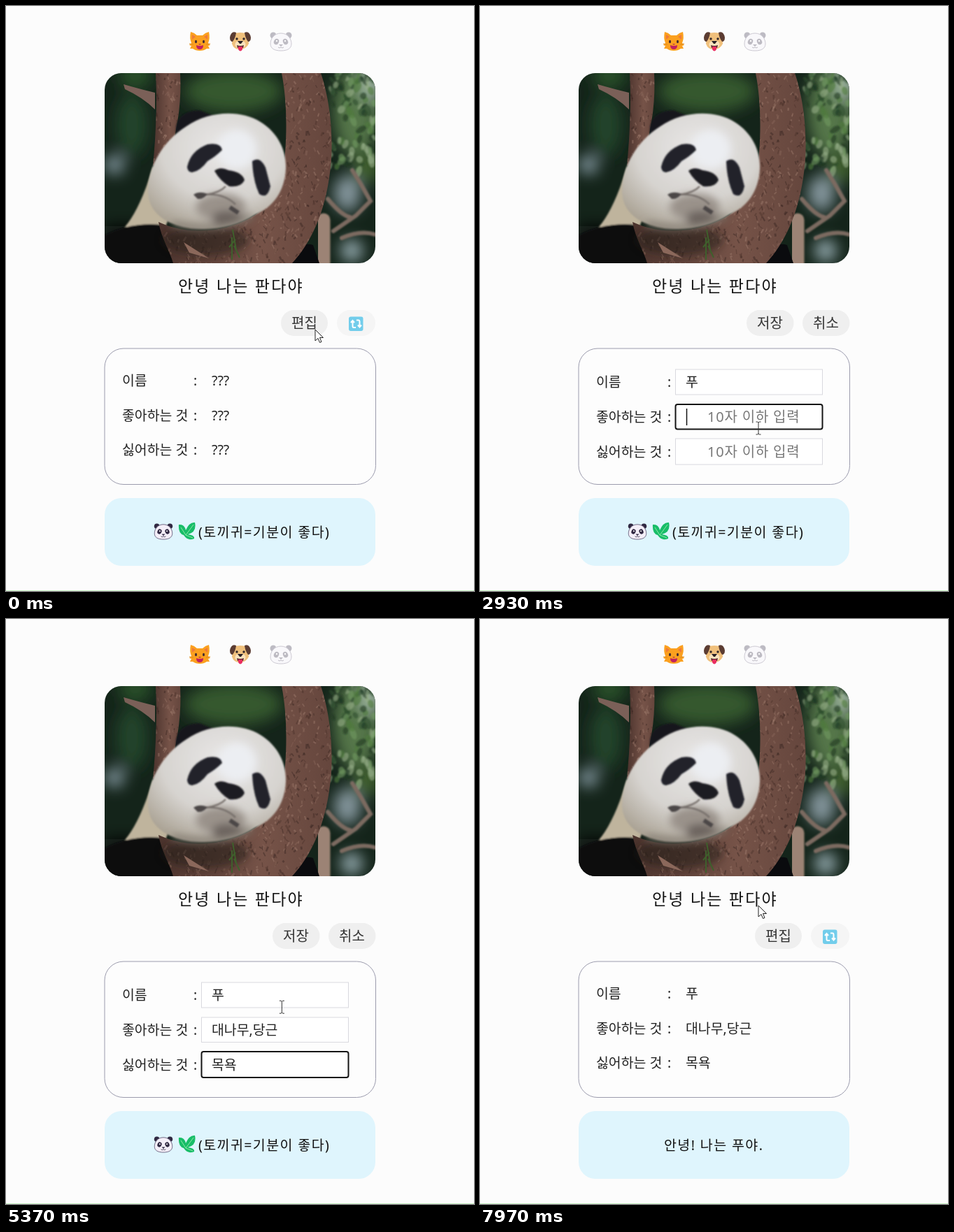
These frames come from a looping animation (669 by 837 pixels, 8000 ms). An HTML page:

```html
<!DOCTYPE html>
<html lang="ko">
<head>
<meta charset="utf-8">
<style>
html, body { margin: 0; width: 100%; height: 100%; overflow: hidden; background: #fcfcfc; }
svg { display: block; width: 669px; height: 837px; }
text { font: 300 19.4px "Noto Sans", "Noto Sans CJK KR", "Noto Sans CJK", sans-serif; fill: #222; white-space: pre; }
.note { font-size: 19.5px; font-weight: 500; letter-spacing: 1.4px; fill: #111; }
.title { font-size: 23px; font-weight: 500; letter-spacing: 2.2px; fill: #111; }
.button { font-size: 20px; fill: #333; }
.hint { font-size: 20px; letter-spacing: .8px; fill: #777; }
</style>
</head>
<body>
<svg viewBox="0 0 669 837">
  <defs>
    <clipPath id="frame"><rect x="141" y="96" width="387" height="272" rx="24"/></clipPath>
    <filter id="soft" x="-50%" y="-50%" width="200%" height="200%"><feGaussianBlur stdDeviation="11"/></filter>
    <filter id="fur" x="-10%" y="-10%" width="120%" height="120%"><feGaussianBlur stdDeviation="1.2"/></filter>
    <filter id="shade" x="-50%" y="-50%" width="200%" height="200%"><feGaussianBlur stdDeviation="6"/></filter>
    <linearGradient id="pressed" x1="0" y1="0" x2=".4" y2="1">
      <stop stop-color="#dedede"/><stop offset="1" stop-color="#b9b9b9"/>
    </linearGradient>
    <radialGradient id="head" cx=".55" cy=".3" r=".75">
      <stop stop-color="#e9e8e8"/><stop offset=".6" stop-color="#d6d3cf"/><stop offset="1" stop-color="#aaa294"/>
    </radialGradient>
    <linearGradient id="bark">
      <stop stop-color="#4b332d"/><stop offset=".6" stop-color="#765348"/><stop offset="1" stop-color="#65463d"/>
    </linearGradient>
    <path id="trunk" d="M394 96C403 140 402 200 395 245C380 292 345 312 300 320C262 325 238 318 218 309C222 332 234 350 239 368H409C442 332 460 282 465 220C468 170 460 125 450 96Z"/>
    <path id="limb" d="M214 96H249Q252 150 236 207L210 229Q217 155 214 96Z"/>
    <clipPath id="woodClip"><use href="#trunk"/><use href="#limb"/></clipPath>

    <g id="cat">
      <path d="M-13-14Q-8-13-4-9H4Q8-13 13-14Q15-5 12 2L15 5L12 6L14 10L10 10Q6 13 0 13T-10 10L-14 10L-12 6L-15 5L-12 2Q-15-5-13-14Z" fill="#fba01f"/>
      <path d="M-11-10L-6-7L-11-3ZM11-10L6-7L11-3Z" fill="#ee7a3b"/>
      <path d="M-15 3L-9 4M15 3L9 4" stroke="#d98a20"/>
      <ellipse cx="-5.500" cy="0" rx="1.500" ry="2.200" fill="#402a32"/><ellipse cx="5.500" cy="0" rx="1.500" ry="2.200" fill="#402a32"/>
      <path d="M-5 5Q0 7 5 5Q5 11 0 11T-5 5Z" fill="#c0215f"/><path d="M-2 3H2L0 5Z" fill="#b93a52"/>
    </g>
    <g id="dog">
      <path d="M-11-11Q0-15 11-11L12 3Q9 10 0 11T-12 3Z" fill="#f0c07c"/>
      <path d="M-6-13Q-13-16-15-6Q-15 0-11 0Q-7-5-6-13ZM6-13Q13-16 15-6Q15 0 11 0Q7-5 6-13Z" fill="#5b3c32"/>
      <ellipse cy="4" rx="7.500" ry="5.500" fill="#fbe3bd"/>
      <circle cx="-5" cy="-4" r="1.700" fill="#2f2529"/><circle cx="5" cy="-4" r="1.700" fill="#2f2529"/>
      <path d="M-4-1H4L1 3H-1Z" fill="#282025"/>
      <path d="M-5 5Q0 7 5 5L4 9H-4Z" fill="#50252c"/>
      <path d="M-3 7H3V11Q0 16-3 11Z" fill="#ea2e61"/>
    </g>
    <g id="panda">
      <circle cx="-11" cy="-9" r="4.500" fill="#302842"/><circle cx="11" cy="-9" r="4.500" fill="#302842"/>
      <path d="M0-12C10-12 15-4 15 3S9 13 0 13S-15 10-15 3S-10-12 0-12Z" fill="#f4eff9" stroke="#5b5270"/>
      <ellipse cx="-6.500" cy="0" rx="3.500" ry="4.300" fill="#302842" transform="rotate(25 -6.500 0)"/>
      <ellipse cx="6.500" cy="0" rx="3.500" ry="4.300" fill="#302842" transform="rotate(-25 6.500 0)"/>
      <circle cx="-6" cy="-1" r="1.200" fill="#fff"/><circle cx="6" cy="-1" r="1.200" fill="#fff"/>
      <path d="M-3 4H3L0 7Z" fill="#302842"/><path d="M-4 8Q-2 10 0 8Q2 10 4 8" fill="none" stroke="#302842"/>
    </g>

    <g id="arrow" stroke="#222" fill="#fff"><path d="M0 0V16L4 12.500L6.500 18.500L9 17.500L6.500 11.500H11.500Z"/></g>
    <g id="hand" stroke="#222" fill="#fff"><path d="M-2 13V1Q-2-1.500 0-1.500T2 1V8Q5 6 6 9Q8 7 9 10Q12 9 12 12V17Q12 20 10 23H0Q-1 20-6 14Q-6 10-2 13Z"/><path d="M3 14V19M6 14V19"/></g>
    <g id="beam" stroke="#333" fill="none"><path d="M-3.500-9H-1.500L0-8L1.500-9H3.500M0-8V8M-3.500 9H-1.500L0 8L1.500 9H3.500"/></g>
  </defs>

  <rect width="669" height="837" fill="#fcfcfc"/>
  <path d="M0 836.500H669" stroke="#c9f3c4"/>
  <use href="#cat" x="277" y="51"/>
  <use href="#dog" x="335" y="51"/>
  <use href="#panda" x="393" y="51" opacity=".3"/>

  <g clip-path="url(#frame)">
    <rect x="141" y="96" width="387" height="272" fill="#14241a"/>
    <g filter="url(#soft)">
      <ellipse cx="325" cy="122" rx="70" ry="30" fill="#34592e"/>
      <ellipse cx="180" cy="170" rx="22" ry="45" fill="#24452b"/>
      <ellipse cx="185" cy="100" rx="24" ry="16" fill="#2c5529"/>
      <ellipse cx="155" cy="227" rx="13" ry="12" fill="#9db2bf"/>
      <ellipse cx="500" cy="150" rx="32" ry="65" fill="#547648"/>
      <ellipse cx="522" cy="112" rx="15" ry="25" fill="#a3b9a5"/>
      <ellipse cx="488" cy="268" rx="19" ry="26" fill="#8799a0"/>
      <ellipse cx="494" cy="350" rx="15" ry="15" fill="#a4bbc2"/>
      <ellipse cx="515" cy="232" rx="18" ry="22" fill="#43632f"/>
      <rect x="141" y="315" width="90" height="60" fill="#080b0d"/>
    </g>
    <g id="leaves" filter="url(#fur)"></g>
    <g fill="none" stroke="#7b6a60" stroke-linecap="round" filter="url(#fur)">
      <path d="M495 235L508 256L521 279L500 300L468 322" stroke-width="6"/>
      <path d="M460 276Q480 300 492 302M480 332Q507 320 528 327" stroke-width="6"/>
      <path d="M454 306V368" stroke="#9c8375" stroke-width="19"/>
    </g>
    <path d="M168 112Q192 119 213 124V148Q196 131 170 119Z" fill="#7b6058"/>
    <use href="#limb" fill="url(#bark)"/>
    <path d="M403 368Q418 335 439 342L448 368Z" fill="#0a0b0e"/>
    <g filter="url(#fur)">
      <path d="M243 184Q240 151 276 149L299 158L255 190Z" fill="#15171d"/>
      <path d="M210 230Q192 290 170 316L225 324L245 270Z" fill="#bfb49d"/>
      <path d="M141 328Q178 309 222 313L246 372H141Z" fill="#090b0f"/>
    </g>
    <use href="#trunk" fill="url(#bark)"/>
    <g id="grain" clip-path="url(#woodClip)"></g>
    <ellipse cx="285" cy="335" rx="62" ry="22" fill="#241a17" opacity=".55" filter="url(#shade)"/>
    <g filter="url(#fur)">
      <path d="M203 266C203 228 226 192 258 172C290 150 335 148 364 166C390 182 401 209 400 232C399 264 382 288 357 298C333 313 309 318 283 319C243 320 204 303 203 266Z" fill="url(#head)"/>
    </g>
    <g filter="url(#shade)">
      <ellipse cx="307" cy="288" rx="36" ry="20" fill="#9a928a"/>
      <ellipse cx="316" cy="303" rx="22" ry="10" fill="#6b625d"/>
      <ellipse cx="330" cy="205" rx="28" ry="28" fill="#eceef2"/>
      <path d="M238 312Q300 326 352 300" fill="none" stroke="#7d756c" stroke-width="7"/>
    </g>
    <g filter="url(#fur)">
      <path d="M259 230Q264 207 288 198Q307 195 309 206Q300 215 288 222Q278 236 266 238Q259 237 259 230Z" fill="#20222a"/>
      <path d="M352 222Q363 214 371 231L378 258Q374 277 362 269Q353 250 352 222Z" fill="#20222a"/>
      <path d="M298 236Q306 229 318 235Q337 237 341 249Q336 260 319 258Q306 250 298 236Z" fill="#1d1b20"/>
      <path d="M314 258Q306 267 286 270Q312 268 328 284" fill="none" stroke="#77706c" stroke-width="2.500"/>
      <path d="M268 270Q276 264 288 269Q282 277 274 276Z" fill="#4b4647"/>
      <path d="M320 288L332 296" stroke="#4b4647" stroke-width="6"/>
    </g>
    <path d="M254 338L290 361L262 353Z" fill="#8b685b"/>
    <path d="M323 363V331M329 349L324 320M319 345L328 334M334 360L326 343" stroke="#3f5f2c" stroke-width="2"/>
  </g>

  <text class="title" x="246" y="409">안녕 나는 판다야</text>

  <rect x="141" y="490" width="387.500" height="194.500" rx="27" fill="#fdfdfd" stroke="#9b9bad"/>
  <g id="view">
    <rect id="editButton" x="393" y="435" width="67" height="37" rx="18.500" fill="#efefef"/>
    <text class="button" x="408" y="461">편집</text>
    <rect x="473" y="435" width="55" height="37" rx="18.500" fill="#f5f5f5"/>
    <rect x="490" y="444.500" width="20.500" height="20.500" rx="3" fill="#72cdeb"/>
    <path d="M500 460H497Q495.500 460 495.500 458V450M493 453L495.500 450L498 453M501 449.500H504Q505.500 449.500 505.500 452V459M503 456.500L505.500 459.500L508 456.500" fill="none" stroke="#fff" stroke-width="2"/>
  </g>
  <g id="edit">
    <rect id="saveButton" x="381" y="435" width="67.500" height="37" rx="18.500" fill="#efefef"/>
    <text class="button" x="396" y="461">저장</text>
    <rect x="461" y="435" width="67.500" height="37" rx="18.500" fill="#efefef"/>
    <text class="button" x="476" y="461">취소</text>
  </g>
  <g id="rows"></g>
  <path id="caret" stroke="#111" stroke-width="1.500"/>

  <rect x="141" y="704" width="387" height="97" rx="24" fill="#dff5fd"/>
  <g class="message">
    <use href="#panda" transform="translate(225 752) scale(.85)"/>
    <path d="M247 742Q255 741 257 750Q262 738 270 739Q273 753 260 756Q270 757 269 762Q260 766 254 757Q246 755 247 742Z" fill="#18bd68"/>
    <path d="M250 746L257 757L268 742M257 757L267 761" fill="none" stroke="#8ee9a6"/>
    <text class="note" x="275" y="760">(토끼귀=기분이 좋다)</text>
  </g>
  <g class="message">
    <text class="note" x="235" y="760">대나무,당근 좋아!!</text>
    <circle cx="417" cy="751" r="12.500" fill="#f8b32d"/>
    <path id="heart" d="M410 752Q402 746 404 741Q407 737 411 741Q415 737 417 742Q417 747 410 752Z" fill="#d9147a"/>
    <use href="#heart" x="13.500"/>
    <path d="M409 754Q417 756 425 754Q424 761 417 761T409 754Z" fill="#7b2941"/>
  </g>
  <g class="message"><text class="note" x="263" y="760">안녕! 나는 푸야.</text></g>
  <use id="cursor"/>
</svg>

<script>
const DURATION = 8000, EDIT_START = 560, EDIT_END = 5680;
const $ = id => document.getElementById(id);
const show = (el, on) => el.setAttribute('visibility', on ? 'visible' : 'hidden');

function add(parent, tag, attrs, text = '') {
  const el = document.createElementNS('http://www.w3.org/2000/svg', tag);
  for (const key in attrs) el.setAttribute(key, attrs[key]);
  el.textContent = text;
  return parent.appendChild(el);
}

let seed = 7;
const random = (low, high) => {
  seed = (seed * 16807) % 2147483647;
  return low + (high - low) * seed / 2147483647;
};
const pick = list => list[Math.floor(random(0, list.length))];

for (let i = 0; i < 90; i++) {
  const x = random(463, 530), y = 94 + 150 * random(0, 1) ** 1.3;
  add($('leaves'), 'ellipse', {
    cx: x, cy: y, rx: random(2, 5), ry: random(4, 9), opacity: .6,
    fill: pick(['#2c4d2b', '#4f7a3c', '#729960', '#94ad86', '#1c3621']),
    transform: `rotate(${random(-40, 60)} ${x} ${y})`
  });
}
for (let i = 0; i < 1100; i++) {
  const x = random(210, 468), y = random(96, 368);
  add($('grain'), 'path', {
    d: `M${x} ${y}l${random(-4, 4)} ${random(2, 7)}`, opacity: .4,
    stroke: pick(['#33221e', '#4a312a', '#8d6a5d', '#a58273']), 'stroke-width': random(1, 3)
  });
}

// Each field lists the states its text passes through while being composed.
const fields = [
  { label: '이름', viewY: 536, editY: 538, top: 520, height: 36, focus: 1350,
    start: 1800, step: 170, states: 'ㅍ 푸' },
  { label: '좋아하는 것', viewY: 585.5, editY: 588, top: 570, height: 35.5, focus: 2650,
    start: 3000, step: 85,
    states: 'ㄷ 대 댄 대나 대남 대나무 대나무, 대나무,ㄷ 대나무,다 대나무,당 대나무,당ㄱ 대나무,당그 대나무,당근' },
  { label: '싫어하는 것', viewY: 635, editY: 637.5, top: 619, height: 37, focus: 4250,
    start: 4600, step: 90, states: 'ㅁ 모 목 목ㅇ 목요 목욕' }
];
for (const field of fields) {
  const rows = $('rows');
  field.states = field.states.split(' ');
  field.box = add(rows, 'rect', { x: 279.5, y: field.top, width: 210, height: field.height });
  field.labels = [
    add(rows, 'text', { x: 166 }, field.label),
    add(rows, 'text', { x: 268 }, ':')
  ];
  field.hint = add(rows, 'text', { x: 325, y: field.editY + 7, class: 'hint' }, '10자 이하 입력');
  field.value = add(rows, 'text', { x: 294 });
}

const path = [
  [0, 442, 463], [150, 432, 458], [600, 430, 456], [1100, 414, 530], [1230, 413, 534],
  [2300, 413, 534], [2750, 398, 604], [3950, 398, 604], [4250, 371, 655], [5150, 371, 655],
  [5600, 419, 450], [5900, 419, 450], [6600, 657, 642], [7530, 657, 642], [7960, 398, 410],
  [DURATION, 398, 410]
];
function pointerAt(t) {
  const i = path.findIndex(point => point[0] > t);
  const [t0, x0, y0] = path[i - 1], [t1, x1, y1] = path[i];
  const p = (t - t0) / (t1 - t0), eased = p * p * (3 - 2 * p);
  return [x0 + (x1 - x0) * eased, y0 + (y1 - y0) * eased];
}

function drawFields(t, editing) {
  const focused = editing ? fields.filter(field => t >= field.focus).pop() : null;
  show($('caret'), false);
  for (const field of fields) {
    const count = Math.floor((t - field.start) / field.step);
    const typed = count < 0 ? '' : field.states[Math.min(count, field.states.length - 1)];
    const active = field === focused, baseline = (editing ? field.editY : field.viewY) + 7;
    for (const label of field.labels) label.setAttribute('y', baseline);
    field.value.setAttribute('y', baseline);
    field.value.textContent = typed || (editing ? '' : '???');
    show(field.hint, editing && !typed);
    show(field.box, editing);
    const style = { fill: '#fff', stroke: active ? '#151515' : '#d9d9df', 'stroke-width': active ? 2 : 1, rx: active ? 3 : 0 };
    for (const key in style) field.box.setAttribute(key, style[key]);
    if (active) {
      const x = 295.5 + (typed ? field.value.getComputedTextLength() : 0);
      const since = t - (t < field.start ? field.focus : field.start);
      $('caret').setAttribute('d', `M${x} ${field.editY - 12}V${field.editY + 12}`);
      show($('caret'), since % 1060 < 530);
    }
  }
}

function drawCursor(t, editing) {
  const [x, y] = pointerAt(t);
  const inside = (left, right, top, bottom) => x > left && x < right && y > top && y < bottom;
  const onButton = t > 60 && (editing ? inside(381, 448, 435, 472) : inside(393, 460, 435, 472));
  const onField = editing && fields.some(f => inside(279, 490, f.top, f.top + f.height));
  $('cursor').setAttribute('href', onButton ? '#hand' : onField ? '#beam' : '#arrow');
  $('cursor').setAttribute('transform', `translate(${x} ${y})`);
  for (const id of ['editButton', 'saveButton'])
    $(id).setAttribute('fill', onButton ? 'url(#pressed)' : '#efefef');
}

const messages = document.querySelectorAll('.message');
function draw() {
  const t = performance.now() % DURATION;
  const editing = t >= EDIT_START && t < EDIT_END;
  const message = t < 6700 ? 0 : t < 7700 ? 1 : 2;
  show($('view'), !editing);
  show($('edit'), editing);
  messages.forEach((el, i) => show(el, i === message));
  drawFields(t, editing);
  drawCursor(t, editing);
  requestAnimationFrame(draw);
}
draw();
</script>
</body>
</html>
```
